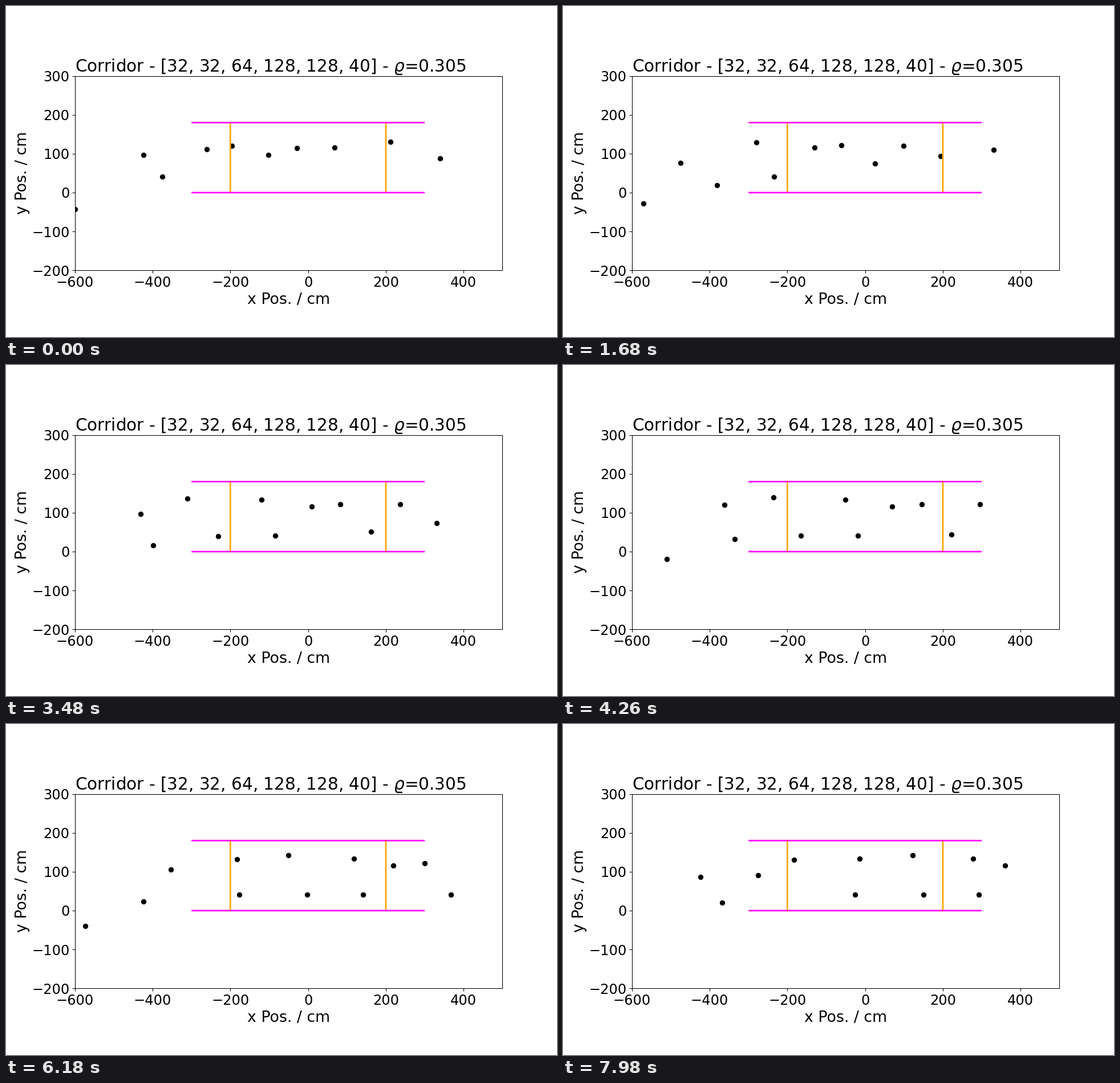
Write a matplotlib script that moves like this. It is 966 px wide and 580 px high and loops after 8000 ms.

```python
import numpy as np
import matplotlib.pyplot as plt
from matplotlib.animation import FuncAnimation

DPI = 96
FRAMES, INTERVAL = 200, 40   # 8 s loop
STEP, STEPS = 0.06, 134      # the walkers move on every 0.06 s
SCALE = 0.6815               # stage pixels per cm
ORIGIN = np.array([529.6, 327.0])

UPPER, LOWER = 236, 299      # stage y of the two lanes
ENTRY_Y, EXIT_X = 360, 782
SETTLE = 0.8                 # s, time to ease into a lane
CLIMB, SINK = 48, 9          # px/s, fastest drift up and down
DRAG = 0.17                  # forward speed lost per pixel below the lane

# Present at the start: x, y, lane, speed
CROWD = [
    (761, 267, 271, 50), (674, 238, 256, 48), (576, 248, 279, 51.4),
    (510, 249, 244, 52.1), (460, 261, LOWER, 51.8), (396, 245, 244, 54.7),
    (352, 251, 248, 53), (274, 299, LOWER, 57), (241, 261, UPPER, 60.3),
    (121, 356, 230, 65.5),
]
# Walking in later: time, x, lane, speed
ARRIVALS = [
    (0.48, 208, LOWER, 57.8), (1.38, 128, UPPER, 64), (2.40, 203, LOWER, 57),
    (3.84, 162, UPPER, 66), (5.16, 193, 260, 60), (6.06, 133, UPPER, 69.5),
    (6.72, 212, LOWER, 59),
]


def simulate():
    """Return the stage positions of all visible walkers for every step."""
    rows = [(0, *c) for c in CROWD]
    rows += [(t, x, ENTRY_Y, lane, v) for t, x, lane, v in ARRIVALS]
    start, x, y, lane, speed = np.array(rows, float).T
    history = []
    for i in range(STEPS):
        here = start <= i * STEP + 1e-6
        shown = here & (x < EXIT_X)
        history.append(np.column_stack([x, y])[shown])
        gap = y - lane
        x = x + here * STEP * (speed - DRAG * np.maximum(gap, 0))
        y = y + here * STEP * np.clip(-gap / SETTLE, -CLIMB, SINK)
    return history


history = simulate()

fig, ax = plt.subplots(figsize=(966 / DPI, 580 / DPI), dpi=DPI)
fig.subplots_adjust(right=0.901)
ax.set_aspect("equal")
ax.set_xlim(-600, 500)
ax.set_ylim(-200, 300)
ax.set_xticks(range(-600, 500, 200))
ax.set_yticks(range(-200, 301, 100))
ax.tick_params(labelsize=18.1)
ax.set_xlabel("x Pos. / cm", fontsize=20.1)
ax.set_ylabel("y Pos. / cm", fontsize=20.1, labelpad=2)
ax.set_title(r"Corridor - [32, 32, 64, 128, 128, 40] - $\varrho$=0.305",
             fontsize=22.13, loc="left")

bar = dict(lw=2, solid_capstyle="butt", snap=False)
for x in (-200, 200):
    ax.plot([x, x], [0, 180], color="orange", **bar)
for y in (0, 180):
    ax.plot([-300, 300], [y, y], color="magenta", **bar)
dots = ax.scatter([], [], s=36, color="black")


def update(frame):
    step = round(frame * INTERVAL / 1000 / STEP)
    dots.set_offsets((history[step] - ORIGIN) / SCALE * (1, -1))
    return dots,


anim = FuncAnimation(fig, update, frames=FRAMES, interval=INTERVAL,
                     repeat=True, repeat_delay=0)
plt.show()
```
